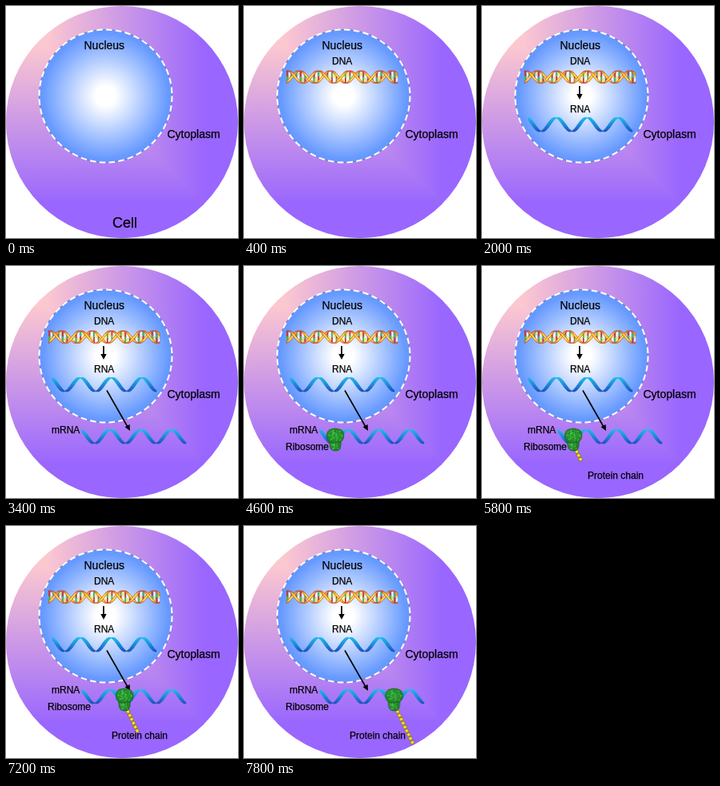
Recreate the animation shown at these times as an HTML page. Size 290x290 px, loop 8000 ms.

```html
<!DOCTYPE html>
<html lang="en">
<head>
<meta charset="utf-8">
<title>From DNA to protein</title>
<style>
  html, body { margin: 0; width: 100%; height: 100%; overflow: hidden; background: #fff; }
  svg { display: block; width: 100vw; height: 100vh; }
  text {
    font-family: "Liberation Sans", Arial, sans-serif; font-size: 12px;
    fill: #000; stroke: #000; stroke-width: .25px;
  }
  .big { font-size: 14px; }
</style>
</head>
<body>
<svg viewBox="0 0 290 290">
  <defs>
    <linearGradient id="across" gradientUnits="userSpaceOnUse" x1="50" y1="0" x2="248" y2="0">
      <stop stop-color="#fcc8d0"/><stop offset="1" stop-color="#96f"/>
    </linearGradient>
    <linearGradient id="down" gradientUnits="userSpaceOnUse" x1="0" y1="50" x2="0" y2="248">
      <stop stop-color="#fcc8d0"/><stop offset="1" stop-color="#96f"/>
    </linearGradient>
    <radialGradient id="glow">
      <stop offset=".15" stop-color="#fff"/><stop offset=".95" stop-color="#69f"/>
    </radialGradient>
    <linearGradient id="blue" gradientUnits="userSpaceOnUse" x1="0" y1="138" x2="0" y2="158">
      <stop stop-color="#1fc4ee"/><stop offset=".5" stop-color="#1c8cdc"/><stop offset="1" stop-color="#1c48b8"/>
    </linearGradient>
    <linearGradient id="warm" gradientUnits="userSpaceOnUse" x1="0" y1="80" x2="0" y2="98">
      <stop stop-color="#e03a1c"/><stop offset=".3" stop-color="#ffd83a"/>
      <stop offset=".7" stop-color="#ffe04a"/><stop offset="1" stop-color="#e8501c"/>
    </linearGradient>
    <radialGradient id="green" cx=".45" cy=".4">
      <stop stop-color="#38b83c"/><stop offset="1" stop-color="#1f8428"/>
    </radialGradient>
    <clipPath id="round"><circle cx="145" cy="145" r="145"/></clipPath>
  </defs>

  <g clip-path="url(#round)">
    <path fill="url(#across)" d="M0 0H290V290H0Z"/>
    <path fill="url(#down)" d="M0 0L290 290H0Z"/>
  </g>
  <circle cx="124.5" cy="112.5" r="83" fill="url(#glow)" stroke="#7482c8" stroke-width="1.2"/>
  <circle cx="124.5" cy="112.5" r="83" fill="none" stroke="#fff" stroke-width="2" stroke-dasharray="7.6 4.25"/>
  <text class="big" x="97.5" y="54">Nucleus</text>
  <text class="big" x="201.5" y="165">Cytoplasm</text>
  <text id="cell" x="133" y="277" style="font-size:18px">Cell</text>

  <g id="dna"><text x="110" y="73.4">DNA</text></g>
  <g id="arrow1">
    <path d="M122 100V112" stroke="#000" stroke-width="1.7"/>
    <path d="M118.3 110H125.7L122 117Z"/>
  </g>
  <g id="rna"><text x="110" y="133">RNA</text></g>
  <g id="arrow2">
    <path d="M126 155.5L152 201" stroke="#000" stroke-width="1.6"/>
    <path d="M155 206L148.6 201.3L154.7 197.9Z"/>
  </g>
  <g id="mrna"><text x="57" y="209">mRNA</text></g>
  <text id="name" x="52" y="230">Ribosome</text>
  <text id="label" x="132" y="266">Protein chain</text>
  <g id="mover">
    <g id="chain"></g>
    <g id="ribosome" stroke="#165a1e" stroke-width=".7">
      <path fill="url(#green)" d="M-7 216Q-8 229 -3 230.5Q0 231.5 4 230.5Q8 229 7 216Z"/>
      <path fill="url(#green)" d="M-10.5 211Q-10 205 -5 204Q0 202 5 204Q10.5 205 10.8 211Q11 217 7 220Q0 223 -7 220Q-11 217 -10.5 211Z"/>
    </g>
  </g>
</svg>
<script>
const LOOP = 8000;
const PERIOD = 38.5, PEAK = 93;
const $ = id => document.getElementById(id);

function add(parent, tag, attrs) {
  const el = document.createElementNS("http://www.w3.org/2000/svg", tag);
  for (const k in attrs) el.setAttribute(k, attrs[k]);
  parent.appendChild(el);
  return el;
}

const wave = (x, mid, amp) => mid - amp * Math.cos((x - PEAK) * 2 * Math.PI / PERIOD);

// Twisting ribbon between two copies of the wave.
function ribbon(parent, from, to, mid, amp, shift, half, attrs) {
  const top = [], low = [];
  for (let x = from; x <= to; x++) {
    const at = d => x + " " + wave(x - shift + d, mid, amp).toFixed(2);
    top.push(at(half));
    low.unshift(at(-half));
  }
  add(parent, "path", { d: "M" + top.concat(low).join("L") + "Z", "stroke-linejoin": "round", ...attrs });
}

// Base pairs, each half in its own colour.
const bases = ["#d8281c", "#fff", "#3cb832", "#ffee4a"];
for (let x = 54, i = 0; x < 192; x += 2.8, i++) {
  const a = wave(x, 88.7, 7.6), b = wave(x - 15, 88.7, 7.6), m = (a + b) / 2;
  [[a, m, i], [m, b, i + 2]].forEach(([y1, y2, c]) =>
    add($("dna"), "path", { d: `M${x} ${y1}V${y2}`, stroke: bases[c % 4], "stroke-width": 1.7 }));
}
const edge = { stroke: "#b8301c", "stroke-width": .6, fill: "url(#warm)" };
ribbon($("dna"), 53, 192, 88.7, 7.8, 15, 1.7, edge);
ribbon($("dna"), 53, 192, 88.7, 7.8, 0, 1.7, edge);

const rnaLook = { fill: "url(#blue)", stroke: "url(#blue)", "stroke-width": .9 };
const strand = parent => ribbon(parent, 58, 188, 148.2, 8.8, 0, 2.3, rnaLook);
strand($("rna"));
strand(add($("mrna"), "g", { transform: "translate(37 65)" }));

// Grainy surface of the ribosome.
let seed = 7;
const rnd = () => (seed = seed * 16807 % 2147483647) / 2147483647;
for (let i = 0; i < 75; i++) {
  const a = rnd() * 2 * Math.PI, r = Math.sqrt(rnd()), low = i % 3 == 0;
  add($("ribosome"), "circle", {
    cx: Math.cos(a) * r * (low ? 5 : 9), cy: (low ? 225 : 212) + Math.sin(a) * r * (low ? 5 : 8),
    r: .7, stroke: "none", fill: i % 2 ? "#58cc54" : "#1c7426"
  });
}

// Values hold until the next [time, value] step.
function hold(el, prop, steps) {
  const frames = steps.map(([t, v]) => ({ offset: t / LOOP, [prop]: v, easing: "steps(1, end)" }));
  frames.push({ offset: 1, [prop]: steps[steps.length - 1][1] });
  el.animate(frames, { duration: LOOP, iterations: Infinity });
}
const fadeIn = (id, t) => hold($(id), "opacity", [[0, 0], [t, .5], [t + 200, 1]]);

hold($("cell"), "opacity", [[0, 1], [200, .5], [400, 0]]);
Object.entries({
  dna: 200, arrow1: 1400, rna: 1800, arrow2: 3000, mrna: 3200,
  name: 4400, ribosome: 4400, label: 5600, chain: 5600
}).forEach(([id, t]) => fadeIn(id, t));

const stops = [114, 125, 136.5, 148, 161, 174, 187.5];
const moveTime = i => i ? 6600 + 200 * i : 0;
hold($("mover"), "transform", stops.map((x, i) => [moveTime(i), `translate(${x}px, 0px)`]));

// One more bead joins the chain with every move.
for (let i = 0; i < 9; i++) {
  const bead = add($("chain"), "circle", {
    cx: 4.5 + 2.3 * i, cy: 232 + 4.8 * i, r: 2.3, fill: "#ffe41a", stroke: "#7a6408", "stroke-width": .7
  });
  if (i > 2) hold(bead, "opacity", [[0, 0], [moveTime(i - 2), 1]]);
}
</script>
</body>
</html>
```
